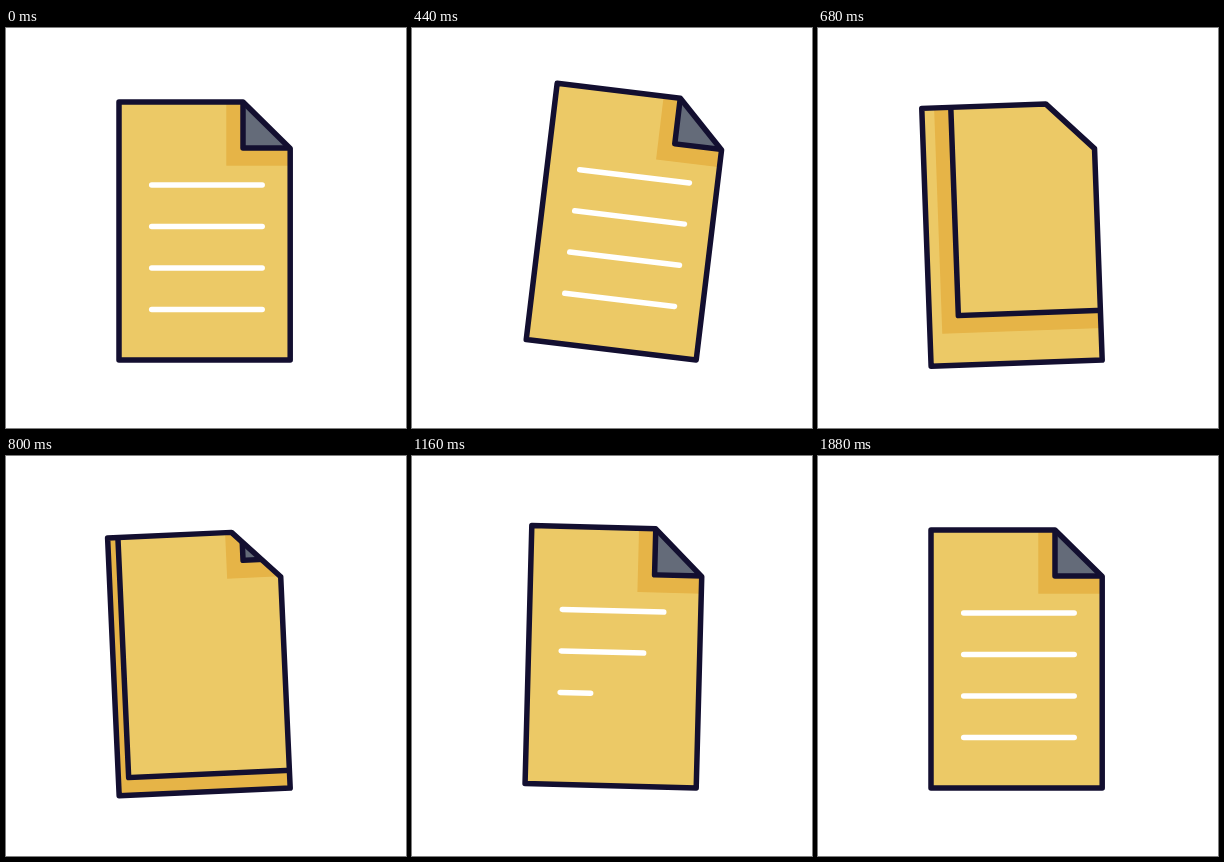
An HTML page with a canvas that plays this animation: 400x400 px, repeating every 2630 ms.

```html
<!DOCTYPE html>
<html lang="en">
<head>
<meta charset="utf-8">
<title>Page turn</title>
<style>
html, body { margin: 0; width: 100%; height: 100%; overflow: hidden; background: #fff; }
canvas { display: block; width: 400px; height: 400px; }
</style>
</head>
<body>
<canvas id="stage" width="400" height="400"></canvas>
<script>
const ctx = document.getElementById('stage').getContext('2d');
const LOOP = 2630, START = 230, END = 1880, STEP = 30;
const INK = '#130f30', PAPER = '#ecc966', SHADE = '#e6b447';
const GREY = [100, 107, 121], YELLOW = [236, 201, 102];
const L = 113, T = 74, R = 284.2, B = 332;   // sheet edges
const FX = 237, FY = 120;                    // inner corner of the fold
const DX = FX - L, DY = B - FY;              // travel of a turning page
const TURN = { at: 490, time: 550 };
const WRITE = { at: 806, gap: 150, time: 625 };
const TILT = [[200, 0], [420, 7], [740, -3], [1073, 2], [1340, 0]];

const clamp = v => Math.min(1, Math.max(0, v));
const smooth = u => u * u * (3 - 2 * u);
const bez = (s, a, b) => 3 * (1 - s) * (1 - s) * s * a + 3 * (1 - s) * s * s * b + s * s * s;

// fast start, long settling tail
function settle(u) {
  u = clamp(u);
  if (u === 0 || u === 1) return u;
  let lo = 0, hi = 1;
  for (let i = 0; i < 24; i++) {
    const mid = (lo + hi) / 2;
    if (bez(mid, 0.12, 0.14) < u) lo = mid; else hi = mid;
  }
  return bez(lo, 0.28, 1);
}

function tilt(t) {
  for (let i = 1; i < TILT.length; i++) {
    const [t0, a0] = TILT[i - 1], [t1, a1] = TILT[i];
    if (t < t1) return a0 + (a1 - a0) * smooth(clamp((t - t0) / (t1 - t0)));
  }
  return 0;
}

function mix(a, b, k) {
  return `rgb(${a.map((v, i) => Math.round(v + (b[i] - v) * k)).join()})`;
}

function sheetPath() {
  ctx.beginPath();
  ctx.moveTo(L, T);
  ctx.lineTo(FX, T);
  ctx.lineTo(R, FY + 0.5);
  ctx.lineTo(R, B);
  ctx.lineTo(L, B);
  ctx.closePath();
}

// everything right of x and above y, with its shadow
function flap(x, y, fill) {
  const far = 500;
  ctx.fillStyle = SHADE;
  ctx.fillRect(x - 16.7, y + 17.7 - far, far, far);
  ctx.beginPath();
  ctx.rect(x, y - far, far, far);
  ctx.fillStyle = fill;
  ctx.fill();
  ctx.strokeStyle = INK;
  ctx.stroke();
}

function textLine(i, k) {
  if (k <= 0) return;
  const y = 157 + i * 41.5;
  ctx.beginPath();
  ctx.moveTo(145.7, y);
  ctx.lineTo(145.7 + 110.5 * k, y);
  ctx.strokeStyle = '#fff';
  ctx.stroke();
}

function draw(t) {
  const p = settle((t - TURN.at) / TURN.time);
  const r = 1 - p;
  ctx.fillStyle = '#fff';
  ctx.fillRect(0, 0, 400, 400);
  ctx.save();
  ctx.translate(R, B);
  ctx.rotate(tilt(t) * Math.PI / 180);
  ctx.translate(-R, -B);
  ctx.lineWidth = 5.5;
  ctx.lineCap = ctx.lineJoin = 'round';

  ctx.save();
  sheetPath();
  ctx.clip();
  ctx.fillStyle = PAPER;
  ctx.fillRect(L, T, R - L, B - T);
  if (r > 0) {
    for (let i = 0; i < 4; i++) textLine(i, 1);
    const k = smooth(clamp((t - TURN.at) / 160));
    flap(FX - DX * p, FY + DY * p, mix(GREY, YELLOW, k));
  }
  if (p > 0) {
    flap(FX + DX * r, FY - DY * r, mix(GREY, YELLOW, 0));
    for (let i = 0; i < 4; i++) {
      textLine(i, settle((t - WRITE.at - i * WRITE.gap) / WRITE.time));
    }
  }
  ctx.restore();

  sheetPath();
  ctx.strokeStyle = INK;
  ctx.stroke();
  ctx.restore();
}

const origin = performance.now();
function tick() {
  const t = (performance.now() - origin) % LOOP;
  if (t < START) draw(0);
  else if (t >= END) draw(LOOP);
  else draw(START + Math.floor((t - START) / STEP) * STEP);
  requestAnimationFrame(tick);
}
tick();
</script>
</body>
</html>
```
